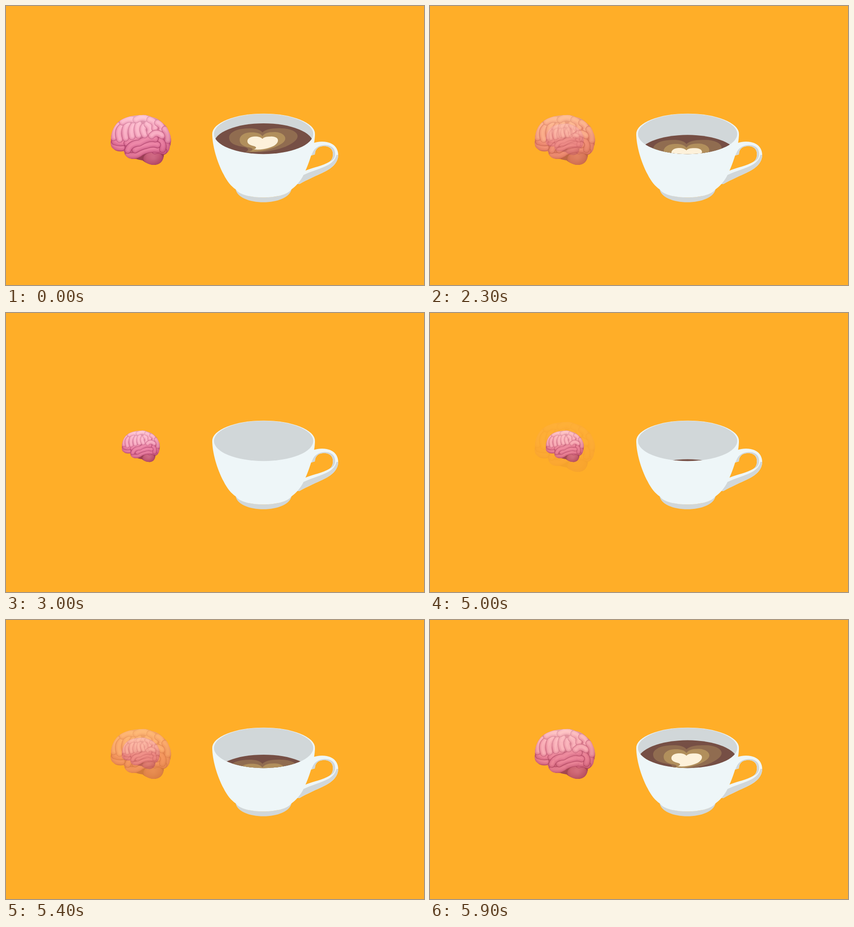
Animation, 916 px wide and 611 px high, one loop 6000 ms. Source, as an HTML page with a canvas:

```html
<!DOCTYPE html>
<html lang="en">
<head>
<meta charset="utf-8">
<title>Brain and coffee</title>
<style>
html, body { margin: 0; width: 100%; height: 100%; overflow: hidden; background: #ffae28; }
canvas { display: block; width: 916px; height: 611px; }
</style>
</head>
<body>
<canvas id="stage" width="916" height="611"></canvas>
<script>
const W = 916, H = 611, LOOP = 6000, STEPS = 11;
const ctx = document.getElementById('stage').getContext('2d');

const WHITE = '#eef6f8', GREY = '#d1d7d9';

const cup = {
  body: 'M452 280C452 305 462 341 477 369C484 383 493 395 504 402C518 425 610 425 625 402C635 395 642 387 650 374C665 345 677 306 677 280Z',
  base: 'M503 399C506 440 622 440 626 399C615 426 515 426 503 399Z',
  handle: 'M671 301C682 297 693 296 703 298C719 301 728 312 728 326C728 342 716 354 700 362C680 372 660 380 643 390L634 390L655 361C674 353 695 350 709 341C716 336 717 328 716 320C714 310 704 306 694 307C683 308 677 315 677 325L667 328Z',
  inner: 'M669 327L677 325C677 315 683 308 694 307C704 306 714 310 716 320C717 328 716 336 709 341C721 337 724 325 719 314C713 304 700 303 689 306C679 309 674 316 672 321Z',
  under: 'M728 326C728 342 716 354 700 362C680 372 660 380 643 390L634 390L650 371C670 361 692 356 708 347C717 341 722 335 724 326Z'
};

const latte = [
  ['#906c50', 'M562 277C555 267 535 267 518 269C501 271 489 279 489 288C489 302 505 306 522 309C532 311 534 316 524 320C560 323 600 315 619 305C632 298 639 292 639 285C639 275 622 268 604 268C585 267 568 270 562 277Z'],
  ['#b18f5c', 'M562 285C556 277 544 276 533 277C520 278 512 285 512 293C512 304 523 308 534 310C544 312 542 317 532 319C562 320 585 312 598 305C607 300 612 296 612 290C612 282 601 276 588 276C574 276 566 279 562 285Z'],
  ['#fdf1da', 'M562 291C558 286 549 285 542 286C534 287 529 291 529 296C529 303 537 305 544 307C550 309 549 312 543 314C564 316 581 310 589 305C594 301 596 298 596 294C596 289 589 285 579 286C571 286 565 287 562 291Z']
];

const brainShape = 'M230 290C231 274 239 255 257 247C270 241 284 239 298 239C306 238 313 240 319 243C332 245 339 252 345 258C354 264 356 274 359 280C363 291 362 302 359 308C358 319 351 324 346 326C345 338 339 345 331 347C320 350 308 345 299 338C290 337 284 334 277 335C266 334 260 327 258 318C247 320 240 317 236 313C229 309 229 301 230 290Z';

// Folds as quadratic strokes, each list painted from back to front.
const upperFolds = [
  'M236 288Q234 271 246 261', 'M249 292Q242 273 254 264', 'M262 289Q257 270 267 258',
  'M276 286Q272 271 279 262', 'M290 283Q284 268 291 258', 'M304 282Q297 271 302 264',
  'M255 254Q268 245 279 249', 'M285 249Q298 241 309 247', 'M309 259Q319 266 315 277',
  'M315 249Q330 254 326 268', 'M332 256Q346 263 340 274', 'M319 284Q329 273 342 284',
  'M348 270Q357 280 355 294'
];
const lowerFolds = [
  'M234 303Q239 312 254 310', 'M238 297Q252 302 262 297', 'M265 300Q275 292 288 292',
  'M351 303Q357 308 350 319', 'M326 317Q336 314 346 318',
  'M267 327Q284 331 297 320Q314 311 334 314', 'M338 295Q347 303 343 314',
  'M283 315Q296 307 308 305Q322 300 332 304', 'M267 316Q272 301 292 300Q312 287 327 291'
];

function fill(target, path, color) {
  target.fillStyle = color;
  target.fill(new Path2D(path));
}

function oval(target, x, y, rx, ry) {
  target.beginPath();
  target.ellipse(x, y, rx, ry, 0, 0, Math.PI * 2);
}

function drawFold(g, path, dark, mid, light) {
  const fold = new Path2D(path);
  g.strokeStyle = dark;
  g.lineWidth = 15;
  g.stroke(fold);
  g.strokeStyle = mid;
  g.lineWidth = 12.5;
  g.stroke(fold);
  g.save();
  g.translate(0.5, -1);
  g.strokeStyle = light;
  for (const width of [9, 6, 3]) {
    g.lineWidth = width;
    g.stroke(fold);
  }
  g.restore();
}

function shadeBrain(g, gradient, stops) {
  stops.forEach(([at, color]) => gradient.addColorStop(at, color));
  g.fillStyle = gradient;
  g.fillRect(225, 235, 140, 120);
}

function drawBrain(g) {
  g.save();
  g.clip(new Path2D(brainShape));
  fill(g, brainShape, '#c96387');
  g.lineCap = g.lineJoin = 'round';

  const lobe = g.createRadialGradient(324, 334, 2, 323, 334, 25);
  lobe.addColorStop(0, '#e08298');
  lobe.addColorStop(0.6, '#d06a83');
  lobe.addColorStop(1, '#a34a5f');
  fill(g, 'M282 330Q296 320 315 321L347 319L350 350L300 350Z', '#8f3d4e');
  g.fillStyle = lobe;
  oval(g, 323, 334, 22, 14);
  g.fill();

  for (const path of lowerFolds) drawFold(g, path, '#aa4068', '#dc7198', 'rgba(243,140,173,.4)');
  for (const path of upperFolds) drawFold(g, path, '#c05c83', '#ec92b0', 'rgba(255,188,207,.45)');

  shadeBrain(g, g.createRadialGradient(290, 262, 22, 293, 284, 78), [
    [0, 'rgba(255,205,217,.2)'], [0.5, 'rgba(225,95,140,.05)'], [1, 'rgba(150,38,78,.5)']
  ]);
  shadeBrain(g, g.createLinearGradient(0, 239, 0, 348), [
    [0, 'rgba(255,222,228,.5)'], [0.25, 'rgba(255,205,217,.12)'],
    [0.6, 'rgba(170,50,85,0)'], [1, 'rgba(150,50,70,.28)']
  ]);
  g.restore();
}

function makeBrain(scale, x, y) {
  const layer = document.createElement('canvas');
  layer.width = W;
  layer.height = H;
  const g = layer.getContext('2d');
  g.translate(x, y);
  g.scale(scale, scale);
  g.translate(-295.5, -293.5);
  drawBrain(g);
  return layer;
}

const bigBrain = makeBrain(1, 295.5, 293.5);
const smallBrain = makeBrain(0.63, 295.5, 292);

function drawLayer(layer, alpha) {
  ctx.globalAlpha = alpha;
  ctx.drawImage(layer, 0, 0);
  ctx.globalAlpha = 1;
}

function drawCup(drain) {
  fill(ctx, cup.handle, WHITE);
  fill(ctx, cup.inner, GREY);
  fill(ctx, cup.under, GREY);
  fill(ctx, cup.base, GREY);
  fill(ctx, cup.body, WHITE);
  ctx.fillStyle = WHITE;
  oval(ctx, 564.5, 280, 112.5, 44.3);
  ctx.fill();

  ctx.save();
  oval(ctx, 564.5, 280.2, 108.8, 44);
  ctx.fillStyle = GREY;
  ctx.fill();
  if (drain < 1) {
    ctx.clip();
    ctx.translate(0, drain * 69.7);
    ctx.fillStyle = '#764f45';
    oval(ctx, 564.5, 301, 108.8, 44);
    ctx.fill();
    for (const [color, path] of latte) fill(ctx, path, color);
  }
  ctx.restore();
}

// Both transitions advance in hard 100 ms steps.
function drainAt(t) {
  const steps = start => Math.min(STEPS, Math.max(0, Math.floor((t - start) / 100) + 1));
  return (steps(2000) - steps(5000)) / STEPS;
}

function draw(t) {
  const drain = drainAt(t);
  ctx.fillStyle = '#ffae28';
  ctx.fillRect(0, 0, W, H);
  drawLayer(bigBrain, 1 - drain);
  drawLayer(smallBrain, drain);
  drawCup(drain);
}

const start = performance.now();
function tick() {
  draw((performance.now() - start) % LOOP);
  requestAnimationFrame(tick);
}
tick();
</script>
</body>
</html>
```
